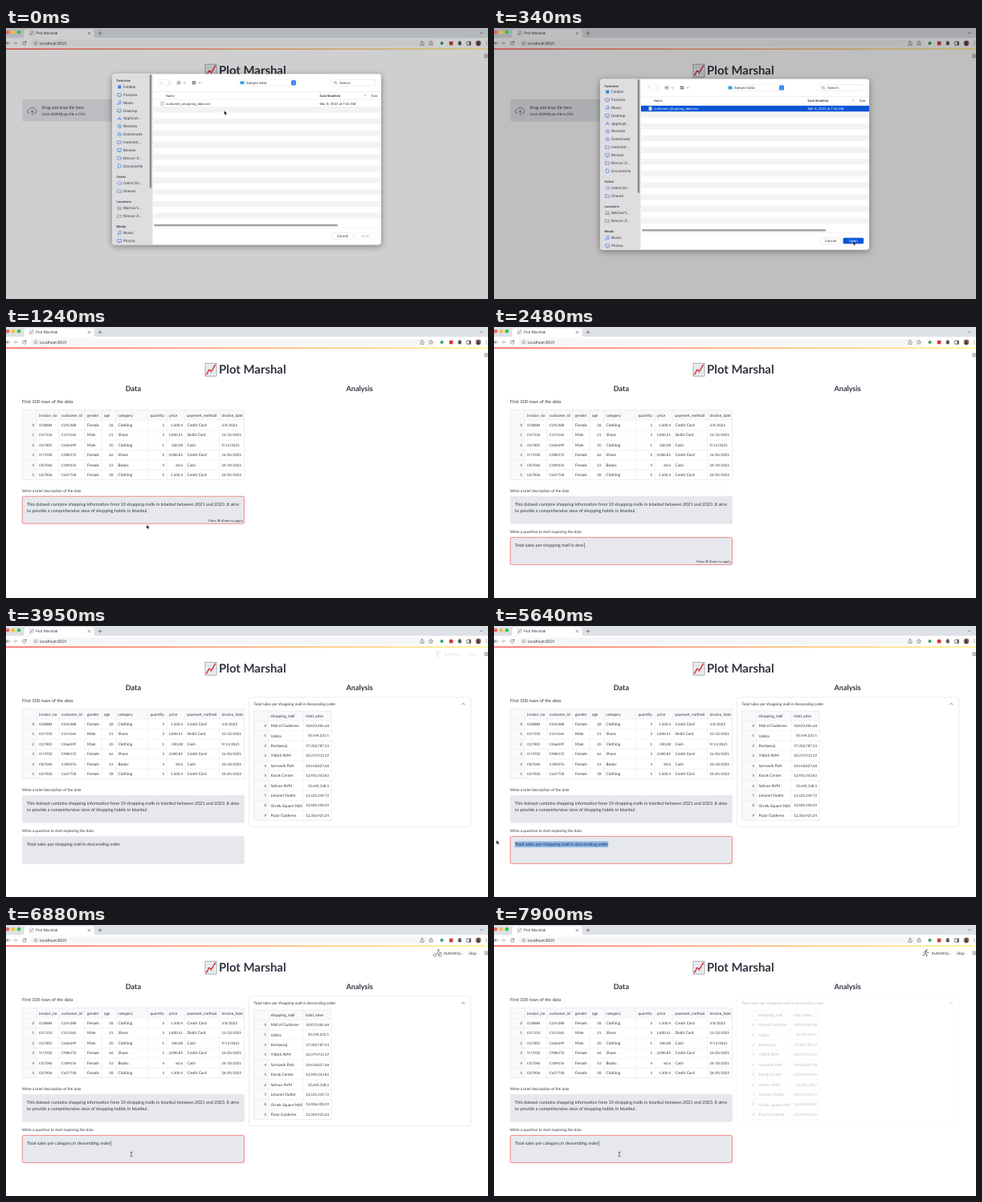
Animation, 600 px wide and 338 px high, one loop 8 s. Source, as an HTML page:

```html
<!DOCTYPE html>
<html lang="en">
<head>
<meta charset="utf-8">
<title>Plot Marshal</title>
<style>
html, body { margin: 0; width: 100%; height: 100%; overflow: hidden; background: #fff; }
svg { display: block; width: 100%; height: 100%; }
text { font-family: Lato, "Open Sans", sans-serif; fill: #31333f; text-rendering: geometricPrecision; white-space: pre; }
.ui text { font-family: Inter, Roboto, sans-serif; }
</style>
</head>
<body>
<svg id="stage" viewBox="0 0 600 338"></svg>
<script>
const LOOP = 8000, STEP = 113;
const APP = "Plot Marshal";
const MALL_Q = "Total sales per shopping mall in descending order";
const CATEGORY_Q = "Total sales per category in descending order";
const INK = "#31333f", GREY = "#83858e", LINE = "#dfe0e4", FIELD = "#e6e8ed", RED = "#f0605c", BLUE = "#0a55d6";

// Markup helpers; text y is the middle of the line.
const text = (x, y, size, str, more = "") =>
  `<text x="${x}" y="${(y + size * .34).toFixed(2)}" font-size="${size}" ${more}>${str}</text>`;
const rect = (x, y, w, h, fill, more = "") =>
  `<rect x="${x}" y="${y}" width="${w}" height="${h}" fill="${fill}" ${more}/>`;
const line = (d, color = "#555", width = .6, more = "") =>
  `<path d="${d}" fill="none" stroke="${color}" stroke-width="${width}" stroke-linecap="round" stroke-linejoin="round" ${more}/>`;
const dot = (x, y, r, fill) => `<circle cx="${x}" cy="${y}" r="${r}" fill="${fill}"/>`;
const group = (id, body, more = "") => `<g id="${id}" ${more}>${body}</g>`;
const fill = color => `fill="${color}"`;
const BOLD = 'font-weight="700"', END = 'text-anchor="end"', MID = 'text-anchor="middle"';

const chartIcon = (x, y, s) => `<g transform="translate(${x} ${y}) scale(${s})">` +
  rect(0, 0, 14, 16, "#f4f6f8", 'stroke="#8d979f" stroke-width=".8"') +
  line("M3.5 0V16M7 0V16M10.5 0V16M0 4H14M0 8H14M0 12H14", "#b9c6cf", .5) +
  line("M1.5 14L5 8L7.5 10.5L12.5 2", "#d8303a", 1.4) + "</g>";

function browser() {
  let s = rect(0, 0, 600, 12.5, "#dee1e6") +
    '<path d="M20 12.5Q22.5 12.5 22.5 10V4Q22.5 1.5 25 1.5H107Q109.5 1.5 109.5 4V10Q109.5 12.5 112 12.5Z" fill="#fff"/>' +
    rect(0, 12.5, 600, 13, "#fff") + rect(30, 14.5, 503, 9, "#f5f6f7", 'rx="4.5"') +
    chartIcon(29.5, 3.8, .33) + text(37, 6.6, 4.7, APP, fill("#333")) +
    text(42, 19.2, 4.9, "localhost:8501", fill("#333"));
  s += line("M102 5L105 8M105 5L102 8M114.8 6.5H119.2M117 4.3V8.7M590.5 5.5L592 7L593.5 5.5");
  s += line("M5 19H.5M2.5 17L.5 19L2.5 21", "#444") + line("M9 19H13.5M11.5 17L13.5 19L11.5 21", "#999");
  s += line("M24.6 17.7A2.2 2.2 0 1 0 25 19.5M25 16.5V18H23.5", "#444");
  s += line("M35 19a2 2 0 1 0 4 0a2 2 0 1 0-4 0M37 19V20", "#666", .5);
  s += line("M516 18.5V21.5H520V18.5M518 20V16.3M516.8 17.4L518 16.2L519.2 17.4", "#555", .5);
  s += line("M529 16.6L529.8 18.2L531.5 18.5L530.2 19.7L530.6 21.4L529 20.5L527.4 21.4L527.8 19.7L526.5 18.5L528.2 18.2Z", "#555", .5);
  s += dot(542.5, 19, 2, "#2fa35b") + rect(551.8, 16.8, 4.6, 4.6, "#cf3a35") +
    rect(562.8, 17.3, 4, 4, "#50545a", 'rx=".6"') + dot(564.8, 17.1, 1, "#50545a") +
    line("M574 17H578.5V21.3H574Z", "#555", .7) + rect(576.5, 17, 2, 4.3, "#555") +
    dot(588, 19, 3.4, "#8f7468") + dot(588, 18, 1.3, "#3a2c2a") + rect(586, 19.6, 4, 1.8, "#3a2c2a", 'rx=".9"') +
    [17, 19, 21].map(y => dot(598, y, .5, "#444")).join("");
  return s;
}

// A table: cols are [left edge, text x, heading, right aligned].
function table(x, y, right, head, cols, rows) {
  const rowH = 12.42, bottom = y + head + rows.length * rowH;
  const ys = rows.map((_, i) => y + head + i * rowH);
  let s = rect(x, y, right - x, bottom - y, "#fff") + rect(x, y, right - x, head, "#f8f9fb") +
    rect(x, y, cols[0][0] - x, bottom - y, "#f8f9fb");
  s += line(ys.map(v => `M${x} ${v}H${right}`).join("") + cols.map(c => `M${c[0]} ${y}V${bottom}`).join(""), "#e6e7ea", .45);
  s += rect(x, y, right - x, bottom - y, "none", `stroke="${LINE}" stroke-width=".5"`);
  cols.forEach(([, tx, name, end], i) => {
    s += text(end ? end[0] : tx, y + head / 2 + .2, 4.8, name, fill(GREY));
    rows.forEach((row, r) => {
      const size = /\d/.test(row[i]) ? 4.45 : 4.8;
      s += text(tx, ys[r] + rowH / 2, size, row[i], end ? END : "");
    });
  });
  rows.forEach((_, r) => s += text(cols[0][0] - 3, ys[r] + rowH / 2, 4.4, r, END + fill(GREY).padStart(20)));
  return s;
}

const salesCols = [[38, 41, "invoice_no"], [66, 69, "customer_id"], [98, 101, "gender"], [119, 133.5, "age", [122]],
  [137, 139.5, "category"], [176.5, 197, "quantity", [179.5]], [200, 220, "price", [203]],
  [223, 225.5, "payment_method"], [266, 268.5, "invoice_date"]];
const salesRows = `I138884 C241288 Female 28 Clothing 5 1,500.4 Credit_Card 5/8/2022
I317333 C111565 Male 21 Shoes 3 1,800.51 Debit_Card 12/12/2021
I127801 C266599 Male 20 Clothing 1 300.08 Cash 9/11/2021
I173702 C988172 Female 66 Shoes 5 3,000.85 Credit_Card 16/05/2021
I337046 C189076 Female 53 Books 4 60.6 Cash 24/10/2021
I227836 C657758 Female 28 Clothing 5 1,500.4 Credit_Card 24/05/2022`
  .split("\n").map(r => r.split(" ").map(c => c.replace("_", " ")));
const mallRows = `Mall of Gulderen|50,872,481.68
Vadira|50,554,231.1
Kentpasaj|37,302,787.33
Yildizli AVM|25,379,913.19
Sarmasik Park|24,618,827.68
Kavak Center|12,901,053.82
Sahnur AVM|12,645,138.2
Limanel Outlet|12,521,339.72
Ornek Square Mall|12,406,100.29
Pazar Gulderen|12,303,921.24`.split("\n").map(r => r.split("|"));

const field = (id, y) => rect(20.3, y, 276.2, 34, FIELD, `id="${id}Box" rx="1.6" stroke-width=".7"`) +
  line(`M293.5 ${y + 32.8}L295.5 ${y + 30.8}`, "#999", .4);
const hint = (id, y) => text(294.5, y, 4.1, "Press ⌘+Enter to apply", `id="${id}" ${END} fill="#777983"`);

function page() {
  const upload = rect(20.3, 89, 276.2, 27.5, FIELD, 'rx="1.6"') +
    line("M29 106.5a2.7 2.7 0 0 1 .2-5.3a3.9 3.9 0 0 1 7.2 .8a2.4 2.4 0 0 1 .1 4.5H35M32.7 108.5V103M30.8 104.7L32.7 102.8L34.6 104.7", "#6b6e79", .8) +
    text(44.5, 99, 5.2, "Drag and drop file here") + text(44.5, 107.5, 4.5, "Limit 200MB per file • CSV", fill(GREY)) +
    rect(255, 97, 35, 12, "#fff", `rx="1.5" stroke="${LINE}" stroke-width=".5"`) + text(272.5, 103, 5, "Browse files", MID);
  const data = text(20, 93.2, 5.6, "First 100 rows of the data") + table(20.3, 103.5, 296.7, 12.7, salesCols, salesRows);
  const desc = text(20, 204, 4.7, "Write a brief description of the data") + field("desc", 211.2) +
    group("descText", text(26, 221.5, 5.45, "This dataset contains shopping information from 10 shopping malls in Istanbul between 2021 and 2023. It aims") +
      text(26, 229.5, 5.45, "to provide a comprehensive view of shopping habits in Istanbul.")) + hint("descHint", 241.8);
  const ask = text(20, 255.2, 4.7, "Write a question to start exploring the data") + field("ask", 262.4) +
    rect(26, 268.6, 0, 7.4, "#86b4ea", 'id="mark"') + text(26, 272.2, 5.45, "", 'id="askText"') +
    rect(0, 269, .5, 6.6, INK, 'id="caret"') + hint("askHint", 293);
  const result = rect(302.6, 89, 276, 161.5, "#fff", `rx="1.6" stroke="${LINE}" stroke-width=".6"`) +
    text(308.5, 97.3, 4.77, MALL_Q) + line("M567.5 98L569.2 96.4L570.9 98", "#444", .7) +
    table(308.3, 106, 405, 12.3, [[327, 329.5, "shopping_mall"], [370, 402, "total_sales", [373]]], mallRows);
  const people = [
    dot(538.5, 31.2, 1, "#666") + line("M538 33L536.2 35.2L538.3 36V38M538 33L540 34.5H541.5M534 37.5m-1.8 0a1.8 1.8 0 1 0 3.6 0a1.8 1.8 0 1 0-3.6 0M540.5 37.5m-1.8 0a1.8 1.8 0 1 0 3.6 0a1.8 1.8 0 1 0-3.6 0", "#666", .7),
    dot(538.5, 31.2, 1, "#666") + line("M537.8 32.8L537 35.5L539 37L538.6 39.3M537 35.5L536 37.6H533.8M535 34.8L536 33L537.8 32.8L539.2 34.4H541", "#666", .9),
    dot(537.5, 32, 1, "#666") + line("M537.5 33.5V36L535.5 39M537.5 36L539.5 39M534.5 31L535.5 34H539.5L540.5 31", "#666", .9)
  ];
  return rect(0, 25.5, 600, 312.5, "#fff") + rect(0, 25.5, 600, 1.4, "url(#deco)") +
    line("M595.8 33.2H600M595.8 35H600M595.8 36.8H600", "#666", .7) +
    chartIcon(248, 45.2, 1) + text(265, 53.3, 14.9, APP, BOLD + ' fill="#111"') +
    text(158.4, 77.3, 9.1, "Data", BOLD + ` ${MID} fill="#16171c"`) + text(440.2, 77.3, 9.1, "Analysis", BOLD + ` ${MID} fill="#16171c"`) +
    group("upload", upload) + group("data", data) + group("desc", desc) + group("ask", ask) + group("result", result) +
    group("status", people.map((p, i) => group("person" + i, p)).join("") +
      text(545, 35, 4.5, "RUNNING...", fill("#85878f")) + text(576, 35, 4.9, "Stop"));
}

const icons = {
  square: (x, y) => rect(x - 1.9, y - 1.9, 3.8, 3.8, "#2f7be6"),
  folder: (x, y) => `M${x - 2.4} ${y - 1.7}h1.8l.6 .7h2.4v2.8h-4.8z`,
  note: (x, y) => `M${x - 1} ${y + 1.4}v-3.2l2.6-.6v3.2m-2.6 .6a.7 .7 0 1 1-1.2 0m3.8-.6a.7 .7 0 1 1-1.2 0`,
  screen: (x, y) => `M${x - 2.2} ${y - 1.8}h4.4v3.2h-4.4zM${x - 1} ${y + 2.3}h2`,
  round: (x, y) => `M${x - 2.1} ${y}a2.1 2.1 0 1 0 4.2 0a2.1 2.1 0 1 0-4.2 0M${x} ${y - 1.2}v1.3l.9 .7`,
  page: (x, y) => `M${x - 1.6} ${y - 2.2}h2l1.2 1.2v3.2h-3.2z`,
  cloud: (x, y) => `M${x - 1.6} ${y + 1.4}a1.2 1.2 0 0 1 .1-2.3a1.8 1.8 0 0 1 3.4 .3a1 1 0 0 1 0 2z`,
  letterA: (x, y) => `M${x - 1.8} ${y + 1.8}l1.8-3.8l1.8 3.8m-3-1.2h2.6`,
  laptop: (x, y) => `M${x - 1.8} ${y - 1.6}h3.6v2.4h-3.6zM${x - 2.6} ${y + 1.6}h5.2`
};
const places = [
  ["Favorites", 66, "#2f7be6", 73.5, "Foldbin:square Pictures:screen Music:note Desktop:screen Applicati…:letterA Recents:round Downloads:round marlowtr…:folder Movies:screen Nimvor_D…:folder Documents:page"],
  ["Ostrel", 185.5, "#2f7be6", 193.5, "Ostrel_Dri…:cloud Shared:folder"],
  ["Locations", 216.5, "#77777a", 224.6, "Marlow's…:laptop Nimvor_D…:folder"],
  ["Media", 247.5, "#2f7be6", 255.5, "Music:note Photos:screen"]
];

function dialog() {
  let s = rect(132, 57.5, 335, 212.7, "#fff", 'rx="4" filter="url(#shadow)"') + '<g clip-path="url(#sheetClip)">' +
    rect(132, 57.5, 335, 212.7, "#fff") + rect(132, 57.5, 50.5, 213, "#dedddf") + rect(178.7, 58, 2.6, 141.5, "#8e8e90", 'rx="1.3"');
  for (const [title, ty, color, y0, list] of places) {
    s += text(137.5, ty, 3.9, title, 'font-weight="600" fill="#858588"');
    list.split(" ").forEach((item, i) => {
      const [name, kind] = item.split(":"), y = +(y0 + i * 9.85).toFixed(2), shape = icons[kind](141.3, y);
      s += (shape[0] === "<" ? shape : line(shape, color, .6)) + text(146, y, 4.5, name.replace("_", " "), fill("#222"));
    });
  }
  s += rect(189.5, 64.5, 16.5, 7.6, "#fff", 'rx="1.5" stroke="#e3e3e3" stroke-width=".5"') +
    line("M194 66.8L192.6 68.3L194 69.8M201.8 66.8L203.2 68.3L201.8 69.8", "#aaa") +
    line("M213 66.8H217M213 68.3H217M213 69.8H217M221 67.8L222.2 69L223.4 67.8M240 67.8L241.2 69L242.4 67.8", "#555", .6) +
    [0, 1, 2, 3].map(i => rect(232 + i % 2 * 2.4, 66.3 + (i >> 1) * 2.2, 1.8, 1.6, "#555")).join("") +
    rect(288, 64.3, 74, 8, "#fff", 'rx="1.6" stroke="#e6e6e6" stroke-width=".5"') +
    rect(291.5, 66.3, 5, 4, "#37a3e0", 'rx=".6"') + text(298.7, 68.3, 4.3, "Sample Data", fill("#222")) +
    rect(355.2, 65.2, 5.6, 6.2, "#1d6ff0", 'rx="1.4"') + line("M357 67.6L358 66.5L359 67.6M357 69L358 70.1L359 69", "#fff") +
    rect(405.3, 64.3, 54.5, 7.8, "#fff", 'rx="1.6" stroke="#ddd" stroke-width=".5"') +
    line("M408.6 68a1.3 1.3 0 1 0 2.6 0a1.3 1.3 0 1 0-2.6 0M411 69L412 70", "#666", .5) + text(415, 68.3, 4.2, "Search", fill("#999"));
  s += line("M183 79.5H467M183 89H467", "#e2e2e2", .5) + text(199, 84.3, 3.9, "Name", fill("#444")) +
    text(390.5, 84.3, 3.8, "Date Modified", 'font-weight="600" fill="#222"') +
    line("M446 83.7L447.2 84.9L448.4 83.7", "#555", .5) + text(454.5, 84.3, 3.9, "Size", fill("#444"));
  for (let y = 98.1; y < 242; y += 14.7) s += rect(182.5, y.toFixed(1), 285, 7.35, "#f3f3f4");
  s += rect(183, 90.7, 284, 7.3, BLUE, 'id="pick"') + rect(192.8, 91.9, 3.6, 4.8, "#fff", 'stroke="#888" stroke-width=".4"') +
    line("M193.8 93.6H195.4M193.8 95H195.4", "#58a06a", .5) +
    text(199, 94.4, 4.05, "customer_shopping_data.csv", 'class="row"') + text(390.5, 94.4, 4, "Mar 9, 2023 at 7:44 AM", 'class="row"') +
    rect(184, 244.8, 229, 2.4, "#a2a2a4", 'rx="1.2"') + line("M183 249H467", "#e4e4e4", .5) +
    rect(406, 255.3, 26, 7.8, "#fff", 'rx="1.6" stroke="#d9d9d9" stroke-width=".5"') + text(419, 259.3, 4.4, "Cancel", MID + ' fill="#222"') +
    rect(434.3, 255.3, 26, 7.8, "#fff", 'id="openBox" rx="1.6" stroke="#e6e6e6" stroke-width=".5"') +
    text(447.3, 259.3, 4.4, "Open", 'id="openText" ' + MID);
  return s + "</g>";
}

document.getElementById("stage").innerHTML =
  `<defs><linearGradient id="deco"><stop stop-color="#ff4b4b"/><stop offset="1" stop-color="#fff27a"/></linearGradient>
  <clipPath id="sheetClip"><rect x="132" y="57.5" width="335" height="212.7" rx="4"/></clipPath>
  <filter id="shadow" x="-10%" y="-10%" width="120%" height="125%"><feDropShadow dx="0" dy="2" stdDeviation="4" flood-opacity=".4"/></filter></defs>` +
  group("browser", browser(), 'class="ui"') + page() + rect(0, 0, 600, 338, "#000", 'id="shade"') +
  dot(2, 5.3, 2.2, "#f05f57") + dot(9, 5.3, 2.2, "#f6bd2e") + dot(16, 5.3, 2.2, "#29c53f") +
  group("dialog", dialog(), 'class="ui"') +
  group("arrow", '<path d="M0 0V5.4L1.3 4.2L2.2 6.2L3.1 5.8L2.2 3.9H4Z" fill="#000" stroke="#fff" stroke-width=".45"/>') +
  group("beam", line("M-1-2.8Q0-2.8 0-2Q0-2.8 1-2.8M0-2V2M-1 2.8Q0 2.8 0 2Q0 2.8 1 2.8", "#222", .6));

const el = {};
document.querySelectorAll("[id]").forEach(n => el[n.id] = n);
const set = (id, attrs) => { for (const k in attrs) el[id].setAttribute(k, attrs[k]); };
const show = (id, on) => el[id].setAttribute("visibility", on ? "visible" : "hidden");
const rows = document.querySelectorAll(".row");

// Pointer stops: time, x, y, shape (empty hides it).
const POINTER = [[0, 271.5, 103, "arrow"], [220, 300, 93, "arrow"], [340, 447, 265.5, "arrow"], [560, 330, 262, "arrow"],
  [790, 190, 235, "beam"], [1130, 175, 246.5, "arrow"], [1460, 168, 268, "beam"], [1580, 156, 280, "beam"],
  [1690, 0, 0, ""], [4400, 60, 303, "arrow"], [4850, 120, 300, "arrow"], [5190, 143, 273, "beam"], [5300, 104, 272, "beam"],
  [5410, 62, 271, "beam"], [5530, 22, 269, "beam"], [5640, 3, 267, "arrow"], [5750, 0, 0, ""],
  [6660, 138, 326, "arrow"], [6770, 150, 296, "arrow"], [6880, 156, 286, "beam"]];
const PEOPLE = [0, 1, 2, 1];

const within = (t, a, b) => t >= a && t < b;
const typed = (str, t, a, b) => str.slice(0, Math.round(str.length * Math.min(1, Math.max(0, (t - a) / (b - a)))));

function render(t) {
  const tick = Math.floor(t / STEP), held = tick * STEP;

  show("dialog", t < 450);
  set("dialog", { transform: `translate(0 ${t < 110 ? 0 : 6.2})` });
  set("shade", { opacity: t < 110 ? .19 : t < 450 ? .25 : 0 });
  const picked = t >= 220;
  set("pick", { opacity: +picked });
  rows.forEach(r => r.style.fill = picked ? "#fff" : "#333");
  set("openBox", { fill: picked ? BLUE : "#fff" });
  el.openText.style.fill = picked ? "#fff" : "#b5b5b5";

  show("upload", t < 680);
  show("data", t >= 680);
  set("desc", { opacity: +(t >= 790) });
  const onDesc = within(t, 900, 1460);
  set("descBox", { stroke: onDesc ? RED : FIELD });
  set("descText", { opacity: +(t >= 1020) });
  set("descHint", { opacity: +within(t, 1020, 1350) });

  set("ask", { opacity: +(t >= 1460) });
  const onAsk = within(t, 1580, 2820) || t >= 5190;
  const question = t < 5750 ? typed(MALL_Q, held, 1690, 2590) : typed(CATEGORY_Q, held, 5750, 6720);
  set("askBox", { stroke: onAsk ? RED : FIELD });
  el.askText.textContent = question;
  set("askHint", { opacity: +(within(t, 1690, 2710) || within(t, 5750, 6880)) });

  const stop = POINTER.filter(p => p[0] <= t).pop();
  const textEnd = 26 + (question ? el.askText.getComputedTextLength() : 0);
  const dragging = within(t, 5300, 5750), from = Math.max(26, stop[1]);
  set("mark", { x: from, width: dragging ? Math.max(0, textEnd - from) : 0 });
  set("caret", { x: textEnd + .2, opacity: +(onAsk && !dragging && (t < 6880 || t % 1000 > 600)) });

  const stale = t < 7110 ? 1 : t < 7220 ? .6 : .33;
  set("result", { opacity: t < 3720 ? 0 : stale });
  const running = within(t, 560, 790) || within(t, 1350, 1690) || within(t, 2710, 3830) || t >= 6880;
  set("status", { opacity: running ? 1 : within(t, 3830, 4060) ? .17 : 0 });
  for (let i = 0; i < 3; i++) set("person" + i, { opacity: +(PEOPLE[tick % 4] === i) });

  for (const kind of ["arrow", "beam"]) {
    show(kind, stop[3] === kind);
    set(kind, { transform: `translate(${stop[1]} ${stop[2]})` });
  }
}

const start = performance.now();
function loop() {
  render((performance.now() - start) % LOOP);
  requestAnimationFrame(loop);
}
loop();
</script>
</body>
</html>
```
